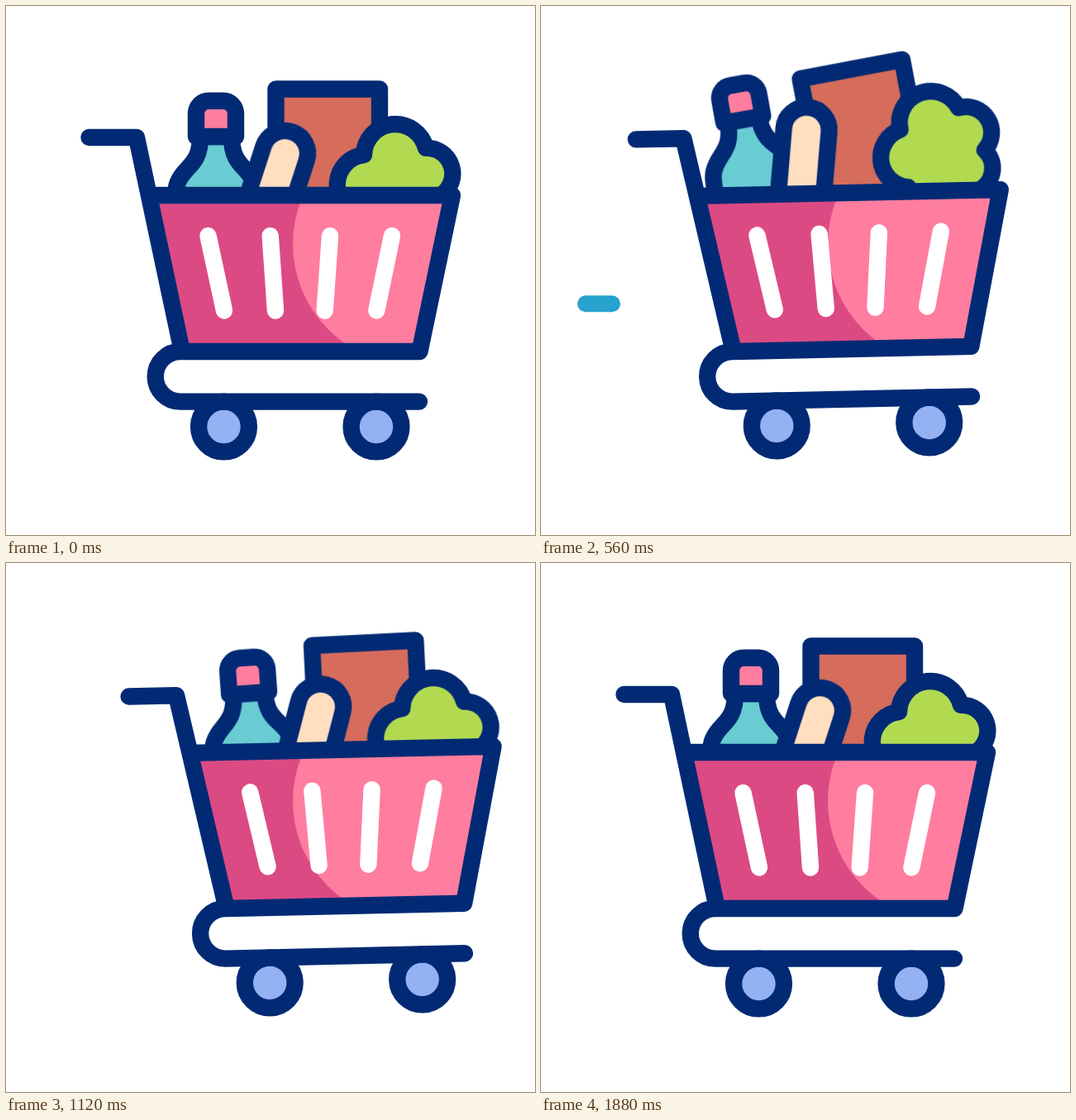
An HTML page that plays this animation: 640 px wide and 640 px high, repeating every 2.24 s.

```html
<!DOCTYPE html>
<html lang="en">
<head>
<meta charset="utf-8">
<title>Shopping cart</title>
<style>
  html, body { margin: 0; width: 100%; height: 100%; overflow: hidden; background: #fff; }
  svg { display: block; width: 100%; height: 100%; }

  .ink { stroke: #022a74; stroke-width: 20.4; stroke-linecap: round; stroke-linejoin: round; }
  .bars { stroke: #fff; stroke-width: 20.4; stroke-linecap: round; }
  .speed { stroke: #28a2cf; stroke-width: 20; stroke-linecap: round; stroke-dasharray: 32 600; stroke-dashoffset: 34; }

  /* The script steps these paused animations at 25 pictures a second. */
  .ride, .item, .speed {
    animation: 2240ms ease-in-out infinite paused;
  }
  .ride { transform-origin: 211px 448px; animation-name: slide, tilt; }
  .box { transform-origin: 389px 110.5px; animation-name: box; }
  .bottle { transform-origin: 254px 136.5px; animation-name: bottle; }
  .bread { transform-origin: 337.5px 178.5px; animation-name: bread; }
  .lettuce { transform-origin: 471px 181px; animation-name: lettuce; }
  .upper { animation-name: upper; animation-timing-function: linear; }
  .lower { animation-name: lower; animation-timing-function: linear; }

  @keyframes slide {
    0% { translate: 0px; }
    17.857% { translate: -28px; animation-timing-function: cubic-bezier(.31, 0, .315, 1); }
    35.714% { translate: 56px; }
    39.286% { translate: 56px; animation-timing-function: cubic-bezier(.9, 0, .665, 1); }
    83.929%, 100% { translate: 0px; }
  }
  @keyframes tilt {
    0%, 28.7%, 42.857%, 57.143%, 100% { rotate: 0deg; }
    17.857% { rotate: -5deg; }
    35.714% { rotate: -4.05deg; }
    50% { rotate: -1.25deg; }
  }
  @keyframes box {
    0%, 60.714%, 100% { transform: translate(0px, 0px) rotate(0deg); }
    17.857% { transform: translate(-33.5px, -24px) rotate(-12.7deg); animation-timing-function: ease-in; }
    25% { transform: translate(-25px, -21px) rotate(-9.5deg); animation-timing-function: ease-out; }
    35.714% { transform: translate(19.4px, 13.5px) rotate(7.2deg); }
    50% { transform: translate(-3px, 0px) rotate(-1.6deg); }
  }
  @keyframes bottle {
    0%, 60.714%, 100% { transform: translate(0px, 0px) rotate(0deg); }
    0% { animation-timing-function: ease-in; }
    17.857% { transform: translate(-14.3px, -11.3px) rotate(-4.7deg); animation-timing-function: ease-out; }
    25% { transform: translate(-26.5px, -20px) rotate(-9deg); }
    35.714% { transform: translate(9.8px, 4px) rotate(3.5deg); }
    50% { transform: translate(-9px, .4px) rotate(-2.8deg); }
  }
  @keyframes bread {
    0%, 60.714%, 100% { transform: translate(0px, 0px) rotate(0deg); }
    17.857% { transform: translate(-26.6px, -23.4px) rotate(-10.3deg); }
    25% { transform: translate(-30.6px, -26.5px) rotate(-12deg); }
    35.714% { transform: translate(12.6px, 19.6px) rotate(5deg); }
    50% { transform: translate(-5.3px, -1.9px) rotate(-2.2deg); }
  }
  @keyframes lettuce {
    0%, 60.714%, 100% { transform: translate(0px, 0px) rotate(0deg); }
    0% { animation-timing-function: ease-in; }
    17.857% { transform: translate(-5.5px, -14px) rotate(-4.5deg); animation-timing-function: ease-out; }
    25% { transform: translate(-13.4px, -34.7px) rotate(-13deg); }
    35.714% { transform: translate(-2px, -5.5px) rotate(-1deg); }
    50% { transform: translate(-2.3px, 1.5px) rotate(1deg); }
  }
  @keyframes upper {
    0%, 19.643% { stroke-dashoffset: 34; }
    25% { stroke-dashoffset: 0; }
    35.714% { stroke-dashoffset: -68; }
    45.6%, 100% { stroke-dashoffset: -132; }
  }
  @keyframes lower {
    0%, 25.446% { stroke-dashoffset: 34; }
    35.714% { stroke-dashoffset: -37; }
    49%, 100% { stroke-dashoffset: -132; }
  }
</style>
</head>
<body>
<svg viewBox="0 0 640 640" fill="none">
  <defs>
    <clipPath id="basket">
      <path class="ride" d="M173 229H540L500.5 418H213Z"/>
    </clipPath>
  </defs>

  <path class="speed upper" d="M54 360.3H184"/>
  <path class="speed lower" d="M54 401H184"/>

  <g class="ride">
    <path class="ink item box" fill="#d56c5c" d="M326.5 100.5H452V280H326.5Z"/>
    <g class="ink item bottle">
      <path fill="#68ccd2" d="M235 158C235 185 224 191 215 202S205 220 205 235V290H303V235C303 220 302 213 293 202S273 185 273 158Z"/>
      <path fill="#ff7d9f" d="M230 158V130A15.3 15.3 0 0 1 245.3 114.7H262.7A15.3 15.3 0 0 1 278 130V158Z"/>
    </g>
    <g class="ink item bread">
      <path fill="#ffdfbf" transform="rotate(18 337.5 178.5)" d="M310 275V178.5A27.5 27.5 0 0 1 365 178.5V275Z"/>
    </g>
    <path class="ink item lettuce" fill="#b1da51" d="M433 180.2A38 38 0 0 1 507.9 171.9A31 31 0 0 1 526 229A30 30 0 0 1 505 275L428 285L425 250A36 36 0 0 1 433 180.2Z"/>
    <path fill="#dc4a84" d="M173 229H540L500.5 418H213Z"/>
  </g>

  <!-- The light stays still while the basket passes through it. -->
  <g clip-path="url(#basket)">
    <circle cx="493" cy="288" r="146" fill="#ff7d9f"/>
  </g>

  <g class="ride">
    <path class="bars" d="M244.5 278L264 368.5M319.7 278L326 368.5M392 278L385.7 368.5M467 278L448.3 368.5"/>
    <g class="ink">
      <circle cx="263.5" cy="509" r="30.4" fill="#94b1f4"/>
      <circle cx="448" cy="509" r="30.4" fill="#94b1f4"/>
      <path d="M100.5 159H158L213 418H500.5L540 229H173M213 418H211A30.3 30.3 0 0 0 211 478.6H500"/>
    </g>
  </g>
</svg>
<script>
  const STEP = 40;
  const start = performance.now();
  const parts = document.getAnimations();

  function tick() {
    const elapsed = performance.now() - start + 2;
    const time = Math.floor(elapsed / STEP) * STEP;
    for (const part of parts) part.currentTime = time;
    requestAnimationFrame(tick);
  }
  tick();
</script>
</body>
</html>
```
